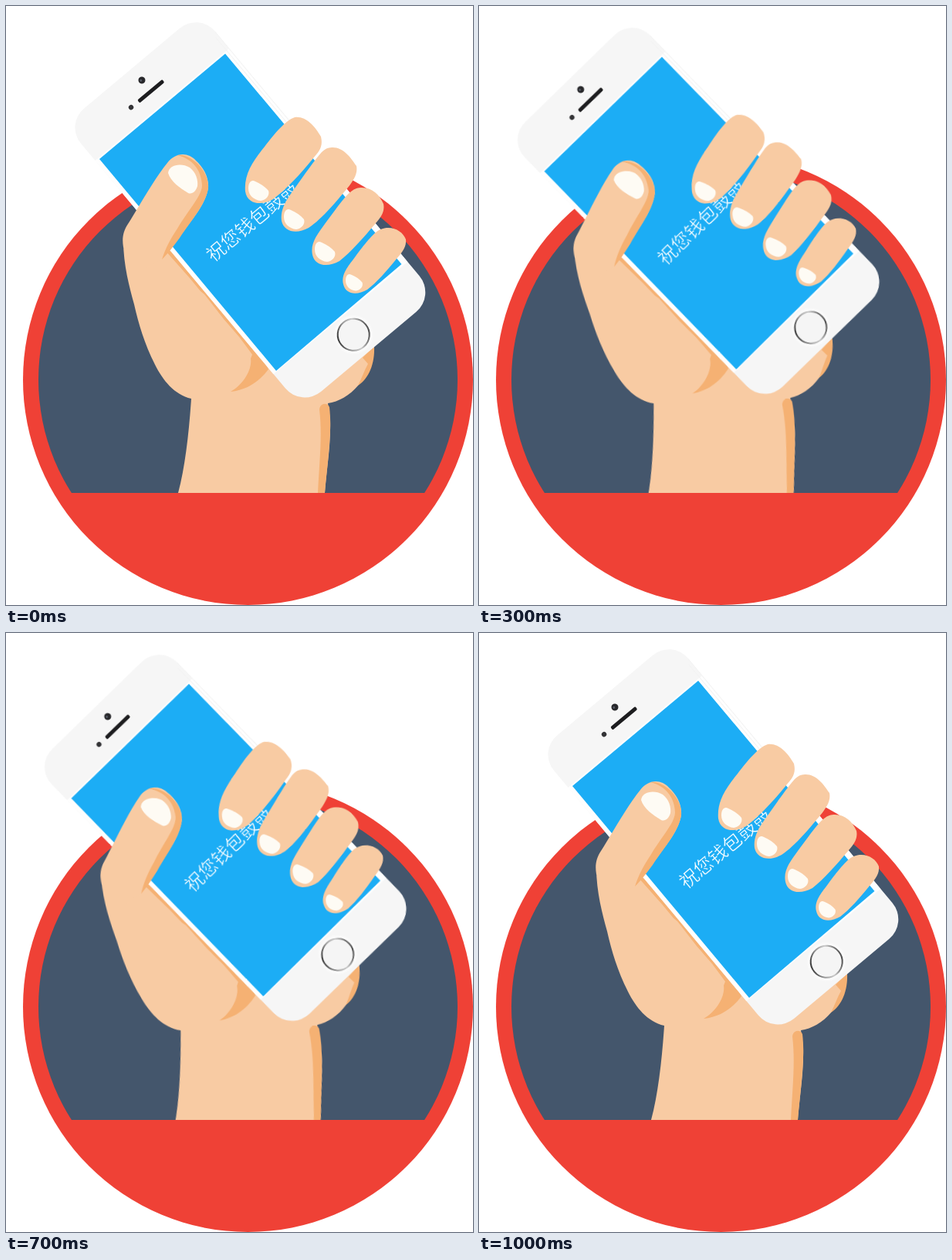
An HTML page for the animation above (2000 ms loop, 605x775 px).

```html
<!DOCTYPE html>
<html lang="zh">
<head>
<meta charset="utf-8">
<title>Shaking phone</title>
<style>
  html, body { margin: 0; width: 100%; height: 100%; overflow: hidden; background: #fff; }
  svg { display: block; width: 605px; height: 775px; }
  .skin { fill: #f8cba3; }
  .shade { fill: #f5b173; }
  .nail { fill: #fefbf4; }
  /* a screen-coloured outline slims the strokes */
  .label { font: 300 24.3px "Noto Sans CJK SC", "Noto Sans CJK", sans-serif; fill: #fff; stroke: #1cadf5; stroke-width: .4px; }
  .shake { transform-origin: 316px 695px; animation: shake 2s step-end infinite; }
  @keyframes shake {
    0%, 20%, 30%, 50%, 100% { transform: rotate(0deg); }
    5%, 15%, 35%, 45% { transform: rotate(-4.27deg); }
    10%, 40% { transform: rotate(-8.6deg); }
    25% { transform: rotate(4.3deg); }
  }
</style>
</head>
<body>
<svg viewBox="0 0 605 775">
  <defs>
    <clipPath id="aboveBase"><rect width="605" height="630"/></clipPath>
    <linearGradient id="ring" x1="0" y1="0.3" x2="1" y2="0.7">
      <stop offset="0" stop-color="#333"/>
      <stop offset="0.3" stop-color="#999"/>
      <stop offset="0.6" stop-color="#ccc"/>
      <stop offset="0.85" stop-color="#777"/>
      <stop offset="1" stop-color="#444"/>
    </linearGradient>
    <path id="nail" d="M0 10C0 2 4 -2 9 1C16 4 22 8 26 13C28 19 23 25 16 26C7 25 0 19 0 10Z"/>
  </defs>

  <circle cx="313.5" cy="483.5" r="291.5" fill="#ef4136"/>
  <g clip-path="url(#aboveBase)">
    <circle cx="313.5" cy="483.5" r="271.5" fill="#44566c"/>
    <g class="shake">
      <!-- arm and palm -->
      <path class="skin" d="M152 304C152 335 160 364 166 386C172 412 179 436 193 464C203 484 218 503 240 508C237 552 232 597 223 630L216 660H409L413 630C415 600 421 570 420 535L417 514C445 510 473 482 477 440L330 420L200 290Z"/>
      <path class="shade" d="M406 522C407 513 417 513 419 519C422 545 419 570 413 630L409 660H401L404 630C406 590 410 555 406 522Z"/>
      <path class="shade" d="M477 440C478 463 470 482 456 491C461 481 464 472 469 463L462 455Z"/>
      <path class="shade" d="M206 316L238 352L252 369L257 373L282 405L302 428L311 440L319 451L317 456C319 468 310 488 291 499C312 497 328 486 340 470L330 450L218 318Z"/>

      <!-- phone -->
      <g transform="translate(121 198) rotate(-39.9)">
        <path fill="#f6f6f6" d="M26.5 -63H188A33 32 0 0 1 221 -31V382A33 33 0 0 1 188 415H27.5A33 33 0 0 1 -5.5 382V-31A32 32 0 0 1 26.5 -63Z"/>
        <path fill="#fefefe" d="M-5.5 -2H221V358H-5.5Z"/>
        <path d="M220.5 -30V120M216.5 -25V120" stroke="#f3f3f3" fill="none"/>
        <path d="M0 0H212.5L213 355.5L0 357Z" fill="#1cadf5"/>
        <circle cx="107.6" cy="-43" r="4.5" fill="#28282b"/>
        <circle cx="106.5" cy="-43.5" r="1.4" fill="#555b66"/>
        <circle cx="74.4" cy="-25" r="3.2" fill="#333336"/>
        <rect x="86.5" y="-27" width="42" height="5" rx="2" fill="#1d1d1f"/>
        <circle cx="106.8" cy="385.5" r="23" fill="#f5f5f5" stroke="#fafafa" stroke-width="4"/>
        <circle cx="106.8" cy="385.5" r="20.5" fill="none" stroke="url(#ring)" stroke-width="2"/>
        <text class="label" x="27" y="197.5">祝您钱包鼓鼓</text>
      </g>

      <!-- thumb -->
      <path class="skin" d="M152 312C150 300 152 291 158 282C171 262 191 225 209 203C220 189 236 189 246 200C256 209 263 222 262 235C260 250 250 265 240 278C226 297 214 314 203 327L180 340Z"/>
      <path class="shade" d="M222 193C238 190 263 212 262 235C260 255 238 280 225 300C217 311 209 321 202 328C207 312 214 300 222 288C235 265 254 246 254 232C253 212 242 198 222 193Z"/>
      <path class="nail" d="M210 216C211 206 226 202 238 209C246 215 249 225 248 233C246 240 241 244 236 242C226 236 213 227 210 216Z"/>

      <!-- fingers -->
      <g class="skin">
        <path d="M310 240C308 218 320 200 335 182C348 165 362 148 374 144C388 142 400 155 408 169C411 182 406 188 398 197C382 217 362 238 346 250C333 258 313 258 310 240Z"/>
        <path d="M357 278C355 262 364 250 374 236C386 219 400 199 409 189C413 185 417 183 422 183C436 182 446 195 454 207C456 217 450 226 442 236C424 258 406 278 392 287C376 296 360 292 357 278Z"/>
        <path d="M397 322C394 307 403 296 413 282C425 266 438 247 447 240C452 236 456 235 461 235C474 235 484 244 489 256C491 266 486 273 479 281C463 300 446 319 432 330C416 339 400 336 397 322Z"/>
        <path d="M437 360C434 347 443 337 452 325C464 309 476 293 485 289C500 283 514 291 518 302C519 311 514 318 506 327C493 343 480 358 468 367C454 375 440 373 437 360Z"/>
      </g>
      <g class="nail">
        <use href="#nail" x="314" y="226"/>
        <use href="#nail" x="360" y="263"/>
        <use href="#nail" x="400" y="305"/>
        <use href="#nail" transform="translate(440 347) scale(.83)"/>
      </g>
    </g>
  </g>
</svg>
</body>
</html>
```
